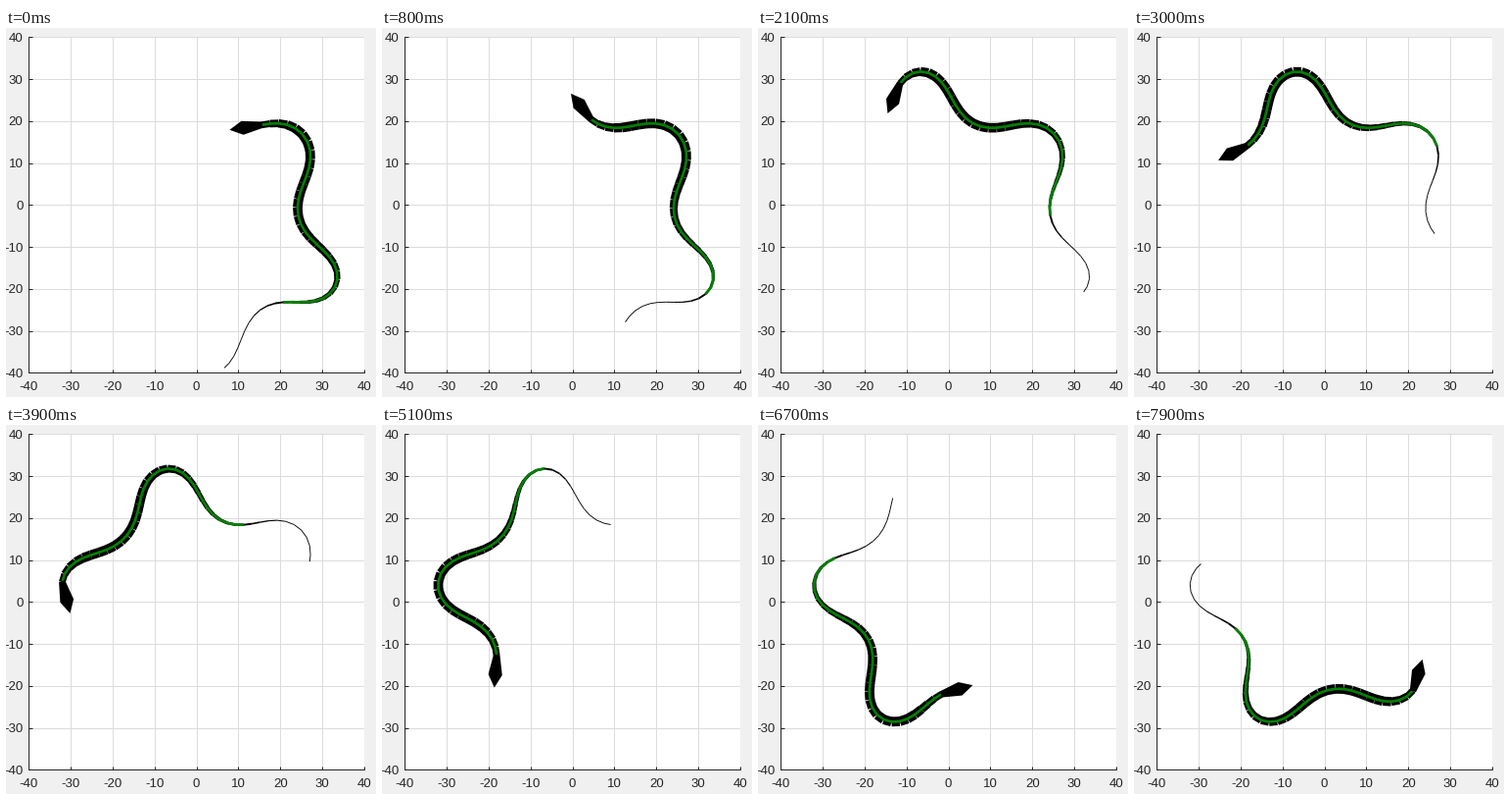
These frames come from a looping animation (378x376 px, 8 s). A matplotlib script:

```python
import numpy as np
import matplotlib.pyplot as plt
from matplotlib.animation import FuncAnimation
from matplotlib.collections import LineCollection

W, H, DPI = 378, 376, 100
PT = 72 / DPI            # points per pixel
FRAMES, STEP_MS = 80, 100
INK, GREEN = "#262626", "#008000"

# Lengths along the track, in axis units
WAVE = 39.5              # one full swing of the heading
LINK = 2.0               # one body link
NECK = 4.6               # neck to widest part of the head
BODY = 90.2              # tail tip to widest part of the head
BARE = 21.5              # tail without a green stripe

# Bend apexes, half a wave apart, that pin the track
APEXES = np.array([(3.5, -40), (15.5, -24.8), (33.1, -19.4), (24.3, -2.7),
                   (25.5, 16.6), (6.4, 19.2), (-7.6, 31.7), (-16.9, 15.5),
                   (-32, 4.5), (-19, -9.1), (-15.6, -27.9), (1.7, -20.8),
                   (20.4, -21.9)])


def smooth(t):
    t = np.clip(t, 0, 1)
    return t * t * (3 - 2 * t)


def hermite(points, t):
    """Smooth curve through points at t = 0, 1, 2, ..."""
    slopes = np.gradient(points, axis=0)
    k = np.clip(t.astype(int), 0, len(points) - 2)
    f = (t - k)[:, None]
    e = smooth(f)
    return (points[k] * (1 - e) + points[k + 1] * e
            + slopes[k] * f * (1 - f) ** 2 - slopes[k + 1] * f * f * (1 - f))


def build_track():
    """Swinging heading with a steady left turn, pulled onto the apexes."""
    u = np.linspace(0, 6.4 * WAVE, 5001)
    mid = (u[:-1] + u[1:]) / 2
    heading = np.radians(-10.6 + 1.742 * mid
                         + 49 * np.sin(2 * np.pi * mid / WAVE))
    moves = np.column_stack([np.cos(heading), np.sin(heading)]) * u[1]
    xy = np.vstack([[0, 0], np.cumsum(moves, axis=0)])
    half = u / (WAVE / 2)
    nodes = np.searchsorted(half, np.arange(len(APEXES)))
    pull = APEXES - xy[nodes]
    pull = np.vstack([pull, pull[-1]])
    return u, xy + hermite(pull, half)


track_u, track_xy = build_track()


def at(u):
    return np.column_stack([np.interp(u, track_u, c) for c in track_xy.T])


def tail_pos(n):
    """Speeds up gently to a steady crawl."""
    return 3.8 + 2.045 * n - 13 * (1 - np.exp(-n / 18.5))


def link_width(d):
    """Width in pixels at distance d from the tail tip."""
    taper = 0.9 + 8.9 * smooth((d - 10) / 50)
    return np.minimum(taper, 6.5 + 0.41 * (BODY - NECK - d))


plt.rcParams["font.family"] = "Liberation Sans"
fig = plt.figure(figsize=(W / DPI, H / DPI), dpi=DPI, facecolor="#f0f0f0")
ax = fig.add_axes([23 / W, 24.6 / H, 343 / W, 342 / H], facecolor="white")
ax.set(xlim=(-40, 40), ylim=(-40, 40))
ticks = range(-40, 41, 10)
labels = [str(v) for v in ticks]
ax.set_xticks(ticks, labels)
ax.set_yticks(ticks, labels)
ax.set_axisbelow(True)
ax.grid(color="#dcdcdc", lw=PT)
ax.tick_params(direction="in", length=3.5 * PT, width=PT, color=INK,
               labelcolor=INK, labelsize=13.3 * PT)
ax.tick_params(axis="x", pad=8.5 * PT)
ax.tick_params(axis="y", pad=5.5 * PT)
ax.spines[["top", "right"]].set_visible(False)
ax.spines[["left", "bottom"]].set(color=INK, linewidth=PT)

links = LineCollection([], colors="black", capstyle="butt", zorder=3)
ax.add_collection(links, autolim=False)
stripe, = ax.plot([], [], color=GREEN, lw=2.7 * PT, zorder=4,
                  solid_capstyle="butt", solid_joinstyle="round")
head, = ax.fill([0, 0, 0], [0, 0, 0], color="black", lw=0, zorder=5)

# Head outline: along and across its axis, from the neck
KITE = [(-0.2, 0.75), (4.6, 1.65), (7.7, 0), (4.6, -1.65), (-0.2, -0.75)]


def draw(n):
    tail = tail_pos(n)
    brow = tail + BODY
    neck = brow - NECK
    u = np.append(np.arange(neck, tail, -LINK), tail)
    joints = at(u)
    links.set_segments(np.stack([joints[:-1], joints[1:]], axis=1))
    links.set_linewidths(link_width((u[:-1] + u[1:]) / 2 - tail) * PT)
    stripe.set_data(*joints[u >= tail + BARE].T)

    base, front = at([neck, brow])
    along = (front - base) / np.hypot(*(front - base))
    across = np.array([-along[1], along[0]])
    head.set_xy([base + a * along + b * across for a, b in KITE])
    return links, stripe, head


anim = FuncAnimation(fig, draw, frames=FRAMES, interval=STEP_MS,
                     repeat=True, repeat_delay=0, blit=False)
plt.show()
```
